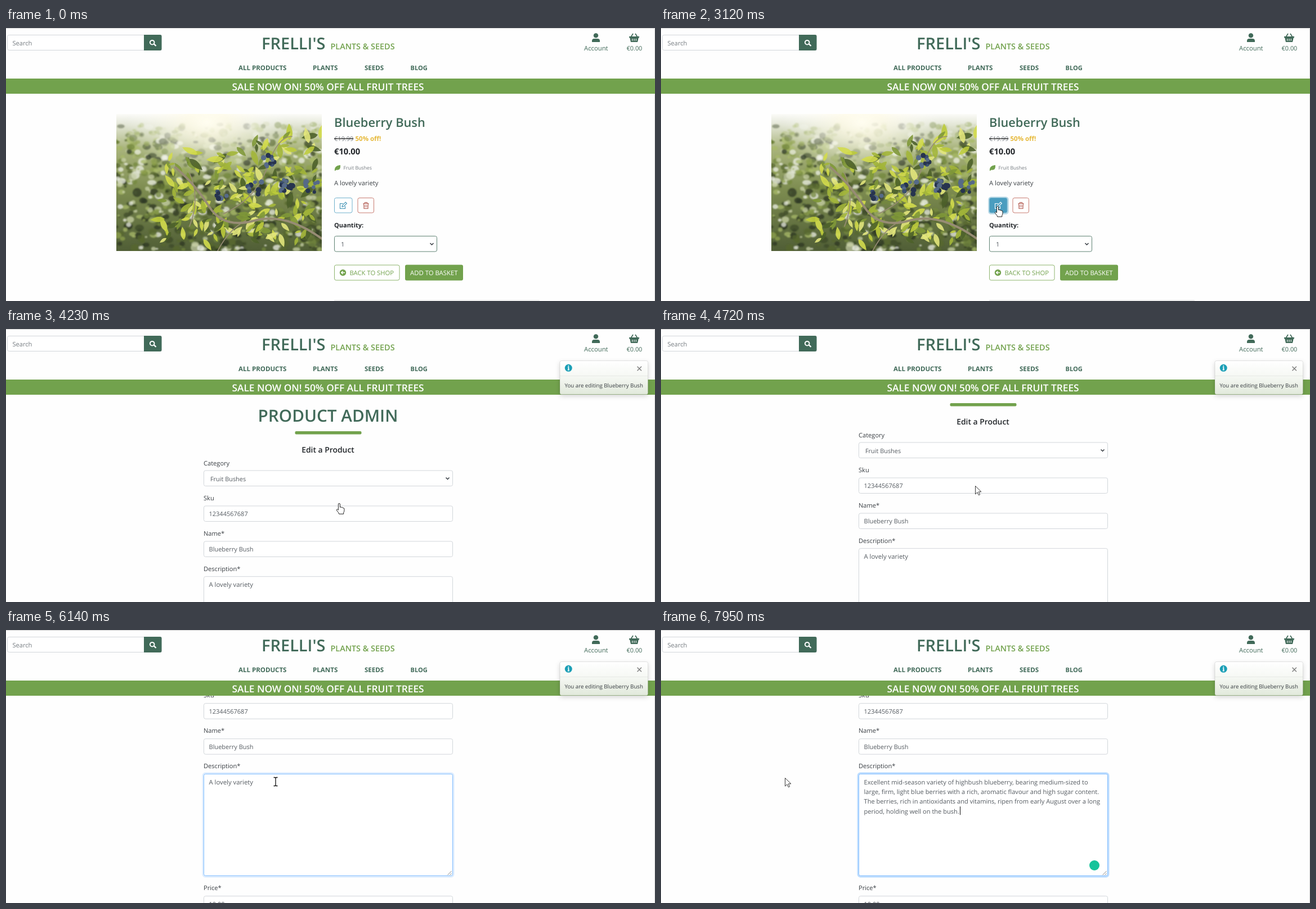
Animation of 1153x486 px, one loop 8000 ms. Source, as an HTML page:

```html
<!DOCTYPE html>
<html lang="en">
<head>
<meta charset="utf-8">
<title>Plant shop: edit a product</title>
<style>
html, body { margin: 0; width: 100%; height: 100%; overflow: hidden; background: #fefefe; }
svg { display: block; }
text { font-family: "Open Sans", "Noto Sans", sans-serif; font-size: 11.1px; text-rendering: geometricPrecision; white-space: pre; }
.pine { fill: #416a59; }
.leaf { fill: #72a24d; }
.ink { fill: #212529; }
.body { fill: #3a3f44; }
.soft { fill: #555b61; }
.grey { fill: #757b80; }
.white { fill: #fff; }
.semi { font-weight: 600; }
.bold { font-weight: 700; }
.mid { text-anchor: middle; }
.line { fill: none; stroke-width: 1.1; }
.box { fill: #fff; stroke: #d2d6da; }
</style>
</head>
<body>
<svg id="stage" width="1153" height="486" viewBox="0 0 1153 486"></svg>
<script>
const LOOP = 8000, PAGE = 3650, PASTE = 7490;

const text = (x, y, str, cls, size = 11.1) =>
  `<text x="${x}" y="${y}" class="${cls}" style="font-size:${size}px">${str.replace(/&/g, '&amp;')}</text>`;
const rect = (x, y, w, h, attrs) => `<rect x="${x}" y="${y}" width="${w}" height="${h}" ${attrs}/>`;
const chevron = (x, y) =>
  `<path d="M${x - 3} ${y - 1.5}l3 3 3-3" fill="none" stroke="#343a40" stroke-width="1.5"/>`;

function seeded(seed) {
  return () => (seed = (seed * 16807) % 2147483647) / 2147483647;
}

function photo() {
  const rnd = seeded(77);
  const pick = list => list[Math.floor(rnd() * list.length)];
  const dark = ['#2b3521', '#3d4a2a', '#55672f', '#74883f'], pale = ['#eef0e6', '#c9d1a8', '#a8b96a', '#8fa24d'];
  const fresh = ['#d3dc4c', '#bccb3c', '#a3b63a', '#7f9838', '#4c602a', '#e2e67c'];
  let blur = '', leaves = '', berries = '';
  for (let i = 0; i < 850; i++) {
    const x = rnd() * 365, y = 18 + rnd() * 226, r = 2 + rnd() * 6;
    blur += `<ellipse cx="${x | 0}" cy="${y | 0}" rx="${r.toFixed(1)}" ry="${(r * (.5 + rnd() * .5)).toFixed(1)}"
      fill="${pick(rnd() < .22 + y / 480 ? dark : pale)}" opacity="${y < 45 ? .45 : .75}"/>`;
  }
  for (let i = 0; i < 210; i++) {
    const x = 85 + rnd() * 280, top = 95 - x * .2, y = top + rnd() * (225 - top), s = .5 + rnd() * .9;
    leaves += `<path d="M0 0Q8-8 22 0Q8 8 0 0" fill="${pick(fresh)}" opacity=".9"
      transform="translate(${x | 0} ${y | 0}) rotate(${(rnd() * 360) | 0}) scale(${s.toFixed(2)})"/>`;
  }
  for (const [cx, cy, n] of [[268, 82, 10], [187, 147, 7], [246, 132, 9], [303, 128, 14], [347, 132, 8]])
    for (let i = 0; i < n; i++) {
      const x = cx + (rnd() - .5) * 26, y = cy + (rnd() - .5) * 24;
      berries += `<circle cx="${x.toFixed(1)}" cy="${y.toFixed(1)}" r="${(3 + rnd() * 2).toFixed(1)}" fill="${pick(['#27344f', '#3c5070', '#566a88'])}"/>`;
    }
  return `<svg x="196" y="153" width="365" height="244" viewBox="0 0 365 244">
    ${rect(0, 0, 365, 244, 'fill="url(#field)"')}
    <g filter="url(#haze)">${blur}</g>
    ${rect(0, 0, 365, 244, 'fill="url(#sun)"')}
    ${leaves}
    <g fill="none" stroke="#978c74" stroke-linecap="round">
      <path d="M105 95Q140 125 165 165T245 190T365 222" stroke-width="4"/>
      <path d="M190 178Q250 150 268 95T312 40M230 190Q200 205 180 244M130 105Q150 150 130 200" stroke-width="1.700"/>
    </g>${berries}</svg>`;
}

const defs = `<defs>
  <linearGradient id="field" x2="0" y2="1"><stop stop-color="#fbfbf8"/><stop offset=".08" stop-color="#e3e6d6"/><stop offset=".25" stop-color="#a9b47c"/>
    <stop offset=".55" stop-color="#7d8c50"/><stop offset="1" stop-color="#505e36"/></linearGradient>
  <radialGradient id="sun" cx=".44" cy=".06" r=".4"><stop stop-color="#fffdf0"/><stop offset=".25" stop-color="#fffbe8" stop-opacity=".75"/>
    <stop offset="1" stop-color="#fff" stop-opacity="0"/></radialGradient>
  <linearGradient id="glass" x2="0" y2="1"><stop stop-color="#fff"/><stop offset=".45" stop-color="#f6f8f4"/><stop offset="1" stop-color="#e1e9db"/></linearGradient>
  <filter id="haze" x="0" y="0" width="1" height="1"><feGaussianBlur stdDeviation="1.1"/></filter>
  <filter id="drop" x="-20%" y="-30%" width="140%" height="170%"><feDropShadow dx="0" dy="3" stdDeviation="4" flood-opacity=".16"/></filter>
</defs>`;

const shop = `<g id="shop">${photo()}
  ${text(583, 176, 'Blueberry Bush', 'pine semi', 21.8)}
  <g text-decoration="line-through">${text(583, 200.7, '€19.99', 'grey', 10.9)}</g>
  ${text(620.5, 200.7, '50% off!', 'bold" fill="#e6b93a', 11.5)}
  ${text(583, 224.5, '€10.00', 'ink bold', 14.7)}
  <path d="M584 254Q583 245 594 244Q595 254 586.500 252.500L584.500 254.500Z" class="leaf"/>
  ${text(599.5, 252, 'Fruit Bushes', 'grey', 8.7)}
  ${text(583, 280.3, 'A lovely variety', 'body', 11.3)}
  ${rect(582.5, 301.5, 34, 29, 'id="ring" rx="4" fill="none" stroke="#4a9dbf" stroke-width="2.6" stroke-opacity=".5"')}
  ${rect(583.5, 302.5, 31.5, 26.5, 'id="edit" rx="3" stroke="#6fb0cc"')}
  <path id="pencil" class="line" d="M602.500 317v4.500h-9v-9h5.500M597 318.500l.6-2.800 5.700-5.600 2.100 2.100-5.700 5.600z"/>
  ${rect(625, 302.5, 28.5, 26.5, 'rx="3" fill="#fff" stroke="#c77a70"')}
  <path class="line" stroke="#b25a50" d="M634.500 312.500h10M637.500 312v-1.500h4v1.500M635.500 313l.5 8.500h7l.5-8.500M638 314.500v5M641 314.500v5"/>
  ${text(583, 354.8, 'Quantity:', 'ink bold', 11)}
  ${rect(583.5, 370.5, 182, 27.5, 'rx="3" fill="#fff" stroke="#5f8273"')}
  ${text(595, 388.5, '1', 'soft')}${chevron(756.5, 384.5)}
  ${rect(583.5, 422, 115.5, 27, 'rx="3" fill="#fff" stroke="#8db46d"')}
  <circle cx="598.5" cy="435.5" r="5.7" class="leaf"/>
  <path d="M602 435.500h-6M598.500 432.700l-2.800 2.800 2.800 2.800" fill="none" stroke="#fff" stroke-width="1.5"/>
  ${text(610.5, 440, 'BACK TO SHOP', 'leaf', 11.25)}
  ${rect(709, 421.5, 103, 28, 'rx="3" class="leaf"')}
  ${text(718, 440, 'ADD TO BASKET', 'white', 11.35)}
  ${rect(583, 484.5, 365, 1, 'fill="#dcdcdc"')}</g>`;

const field = (y, label, value) =>
  text(351, y - 10.5, label, 'body') + rect(351.5, y, 442, 27.5, 'rx="3" class="box"') + text(360.5, y + 18.2, value, 'soft', 11);

const story = ['Excellent mid-season variety of highbush blueberry, bearing medium-sized to',
  'large, firm, light blue berries with a rich, aromatic flavour and high sugar content.',
  'The berries, rich in antioxidants and vitamins, ripen from early August over a long',
  'period, holding well on the bush.'];

const form = `<g id="form">
  ${text(572, 165, 'PRODUCT ADMIN', 'pine semi mid', 29.7)}
  ${rect(513.5, 182, 118, 5.5, 'rx="2" class="leaf"')}
  ${text(572, 220, 'Edit a Product', 'ink semi mid', 13.9)}
  ${text(351, 242.5, 'Category', 'body')}
  ${rect(351.5, 252, 442, 27.5, 'rx="3" class="box"')}
  ${text(363, 270.5, 'Fruit Bushes', 'soft', 10.9)}${chevron(784.5, 266)}
  ${field(315, 'Sku', '12344567687')}
  ${field(378, 'Name*', 'Blueberry Bush')}
  ${text(351, 430.5, 'Description*', 'body')}
  ${rect(350.5, 439.5, 444, 183.5, 'id="glow" rx="4" fill="none" stroke="#bfdeff" stroke-width="4"')}
  ${rect(351.5, 440.7, 442, 181, 'id="area" rx="3" class="box"')}
  <path d="M784.500 620.500l7-7M788.500 620.500l3-3" stroke="#777" stroke-width=".9"/>
  ${rect(360, 446, 79, 17, 'id="mark" fill="#3390ff"')}
  <g id="short">${text(360.5, 459.3, 'A lovely variety', 'soft', 11.3)}</g>
  <g id="picked" clip-path="url(#sel)">${text(360.5, 459.3, 'A lovely variety', 'white', 11.3)}</g>
  <clipPath id="sel">${rect(360, 446, 79, 17, 'id="cut"')}</clipPath>
  <g id="long">${story.map((s, i) => text(360.5, 459.3 + i * 17.25, s, 'soft')).join('')}
    ${rect(531, 498.5, 1, 15, 'fill="#111"')}</g>
  <circle id="badge" cx="770" cy="603.3" r="9" fill="#17c39b"/>
  ${field(658, 'Price*', '10.00')}</g>`;

const header = `${rect(0, 0, 1153, 90, 'fill="#fefefe"')}
  <path d="M276 12.500H5.500a3 3 0 0 0-3 3v21a3 3 0 0 0 3 3H276z" class="box"/>
  ${text(11.5, 31.3, 'Search', 'grey')}
  <path id="go" class="pine"/>
  ${text(454, 38, "FRELLI'S", 'pine semi', 29)}
  ${text(576.5, 38, 'PLANTS & SEEDS', 'leaf semi', 14.4)}
  ${text(413, 75, 'ALL PRODUCTS', 'pine bold', 11.5)}${text(545, 75, 'PLANTS', 'pine bold', 11.6)}
  ${text(637, 75, 'SEEDS', 'pine bold', 11.5)}${text(718.5, 75, 'BLOG', 'pine bold', 11.1)}
  <g id="icons">
    <path d="M263 28.500l3.500 3.500" stroke="#fff" stroke-width="2.4"/>
    <circle cx="259.7" cy="25.7" r="3.8" fill="none" stroke="#fff" stroke-width="2"/>
    <circle cx="1048" cy="13.4" r="4.2" class="pine"/>
    <path d="M1041 25v-2a4 4 0 0 1 4-4h6a4 4 0 0 1 4 4v2z" class="pine"/>
    <path d="M1107 15h18v2.200h-1.200L1122 25h-12l-1.800-7.800H1107z" class="pine"/>
    <path d="M1110.500 15.500l3.500-5.500M1121.500 15.500L1118 10" stroke="#416a59" stroke-width="1.700"/>
    <path d="M1112.700 19v4M1116 19v4M1119.300 19v4" stroke="#fff" stroke-width="1.100"/>
  </g>
  <g id="account">${text(1027, 40, 'Account', 'pine', 11.3)}${text(1102.5, 40, '€0.00', 'pine', 10.8)}</g>
  ${rect(0, 0, 1153, 1, 'fill="#cfcfcf"')}${rect(1152, 0, 1, 486, 'fill="#d8d8d8"')}
  ${rect(0, 90, 1153, 27, 'class="leaf"')}
  ${text(572, 111, 'SALE NOW ON! 50% OFF ALL FRUIT TREES', 'white semi mid', 17.3)}`;

const toast = `<g id="toast">
  ${rect(984, 56.5, 156.5, 60, 'rx="3" fill="url(#glass)" stroke="#000" stroke-opacity=".1" filter="url(#drop)"')}
  ${rect(984, 83, 156.5, 1, 'fill="#000" fill-opacity=".06"')}
  <circle cx="999.3" cy="69.3" r="6.5" fill="#1b9fb6"/>
  <path d="M999.300 65v2M998 68.700h1.500v4M997.800 72.700h3" fill="none" stroke="#fff" stroke-width="1.700"/>
  <path d="M1121.500 66.700l7.500 7.500M1129 66.700l-7.500 7.500" stroke="#808080" stroke-width="1.500"/>
  ${text(992.5, 103.5, 'You are editing Blueberry Bush', 'body', 9.7)}</g>`;

const pointer = `<g id="pointer" stroke-linejoin="round">
  <path id="arrow" d="M.5.500V15L4 11.700l2.400 5.100 2.200-1-2.300-5H11z" fill="#fff" stroke="#222" stroke-width=".9"/>
  <path id="beam" d="M-3.500-7.500H-1L0-6.500 1-7.500H3.500M0-6.500V6.500M-3.500 7.500H-1L0 6.500 1 7.500H3.500" fill="none" stroke="#111" stroke-width="1.300"/>
  <path id="hand" d="M-1.500 10V1.700a1.500 1.500 0 0 1 3 0V7q2-1 2.800.5q2-.8 2.700.8q2-.3 2 1.700V13q0 2-1.200 3.500V19H-.3q0-2-4-6.300q-.8-1.900.7-2.300q1.100 0 2.100 1.600z" fill="#fff" stroke="#222" stroke-width="1"/>
</g>`;

const stage = document.getElementById('stage');
stage.innerHTML = defs + shop + form + header + toast + pointer;
const el = {};
stage.querySelectorAll('[id]').forEach(n => el[n.id] = n);

// time, x, y, pointer shape
const path = [
  [520, 1128, 472, 'arrow'], [800, 1010, 372, 'arrow'], [1050, 900, 292, 'arrow'], [1270, 832, 262, 'arrow'],
  [1500, 760, 247, 'arrow'], [1750, 690, 262, 'arrow'], [1880, 652, 274, 'beam'], [1950, 634, 279, 'beam'],
  [2030, 624, 288, 'arrow'], [2100, 618, 294, 'arrow'], [2170, 567, 276, 'arrow'], [2240, 588, 304, 'hand'],
  [2360, 598, 317, 'hand'], [4160, 598, 317, 'hand'], [4230, 588, 306, 'arrow'], [4300, 566, 286, 'arrow'],
  [4370, 558, 279, 'arrow'], [5570, 558, 279, 'arrow'], [5640, 548, 280, 'beam'], [5990, 479, 270, 'beam'],
  [6140, 479, 270, 'beam'], [6300, 450, 270, 'beam'], [6500, 340, 268, 'arrow'], [6690, 209, 264, 'arrow'],
  [6820, 220, 263, 'arrow']
];
const scroll = [[0, 0], [4640, 16], [4720, 50], [4790, 82], [4850, 92], [5180, 130], [5250, 175.5], [5330, 184.3]];
const fade = [[0, 0], [PAGE, .1], [3730, .4], [3790, .75], [3840, 1]];

const held = (steps, t) => steps.filter(s => s[0] <= t).pop()[1];
const show = (node, on) => node.setAttribute('visibility', on ? 'visible' : 'hidden');

function pointerAt(t) {
  const i = path.findLastIndex(p => p[0] <= t);
  const a = path[i], b = path[i + 1] || a, k = b === a ? 0 : (t - a[0]) / (b[0] - a[0]);
  return { x: a[1] + (b[1] - a[1]) * k, y: a[2] + (b[2] - a[2]) * k, kind: a[3] };
}

function draw(t) {
  const admin = t >= PAGE, loading = admin && t < 3730, focus = t >= 6140, pasted = t >= PASTE;
  el.shop.style.display = admin ? 'none' : '';
  el.form.style.display = admin ? '' : 'none';
  el.form.setAttribute('transform', `translate(0 ${-held(scroll, t)})`);

  show(el.icons, !loading);
  el.account.setAttribute('transform', `translate(0 ${loading ? -8.5 : 0})`);
  const left = loading ? 257.5 : 245;
  el.go.setAttribute('d', `M${left} 12H273.500a3 3 0 0 1 3 3V37a3 3 0 0 1-3 3H${left}z`);
  el.toast.setAttribute('opacity', held(fade, t));

  const hover = t >= 2240;
  el.edit.setAttribute('fill', hover ? '#4a9dbf' : '#fff');
  el.pencil.setAttribute('stroke', hover ? '#fff' : '#3f92b4');
  el.ring.setAttribute('opacity', held([[0, 0], [3030, .35], [3110, .75], [3180, 1]], t));

  el.glow.setAttribute('opacity', held([[0, 0], [6140, .5], [6210, 1]], t));
  el.area.style.stroke = focus ? '#80bdff' : '';

  const pace = 68.2, p = t < 520 ? null : pointerAt(520 + Math.floor((t - 520) / pace) * pace);
  for (const kind of ['arrow', 'beam', 'hand']) show(el[kind], p && p.kind === kind);
  if (p) el.pointer.setAttribute('transform', `translate(${p.x.toFixed(1)} ${p.y.toFixed(1)})`);

  const from = focus ? Math.min(439, Math.max(360, p.x)) : 439;
  for (const node of [el.mark, el.cut]) {
    node.setAttribute('x', from);
    node.setAttribute('width', 439 - from);
  }
  const parts = { mark: !pasted, short: !pasted, picked: !pasted, long: pasted, badge: t >= 6210 };
  for (const id in parts) el[id].style.display = parts[id] ? '' : 'none';
}

function tick() {
  draw(performance.now() % LOOP);
  requestAnimationFrame(tick);
}
tick();
</script>
</body>
</html>
```
